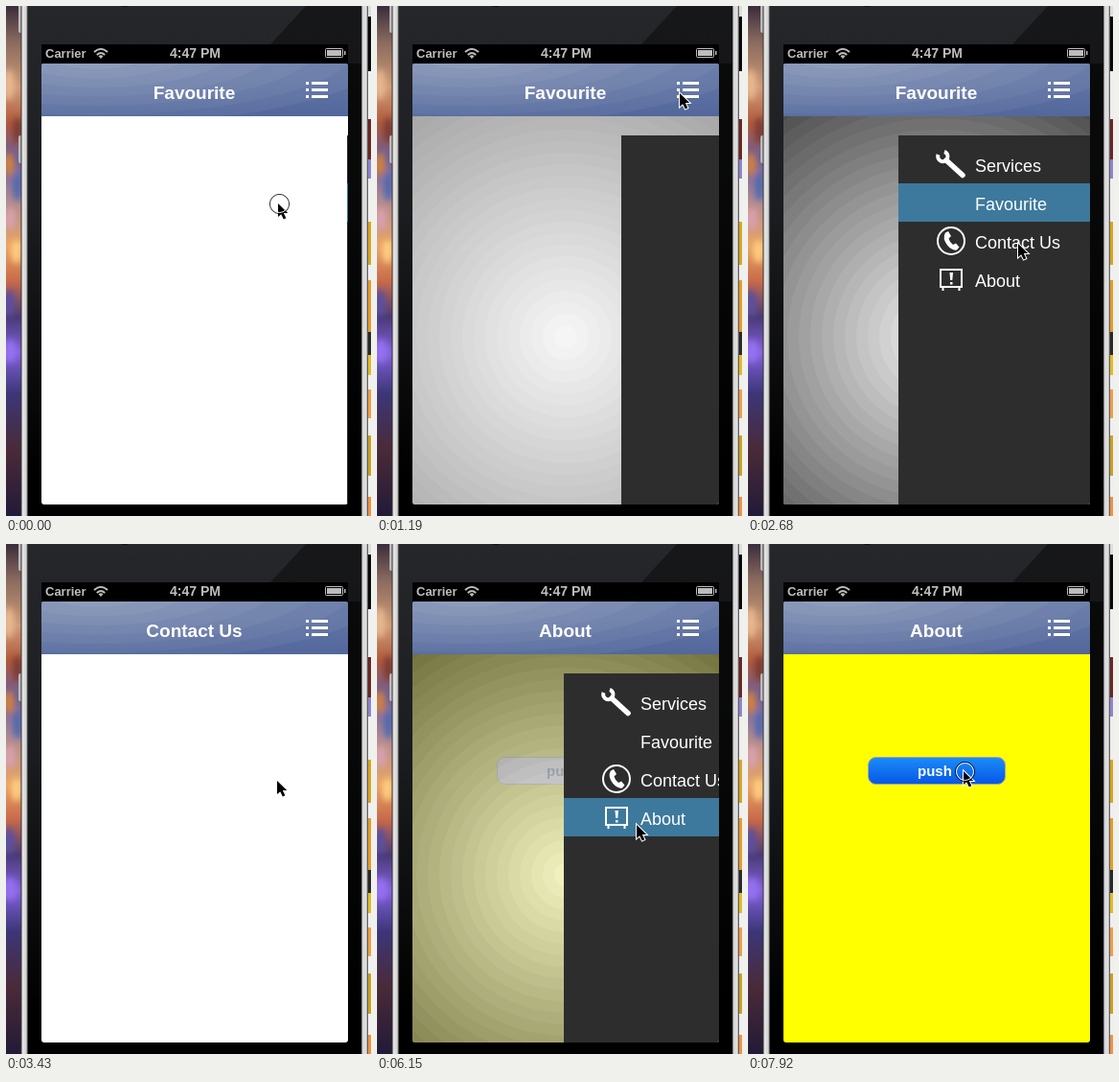
An HTML page for the animation above (8000 ms loop, 381 by 532 pixels).

```html
<!DOCTYPE html>
<html lang="en">
<head>
<meta charset="utf-8">
<title>Side menu</title>
<style>
  html, body { margin: 0; width: 100%; height: 100%; overflow: hidden; background: #000; }
  svg { display: block; width: 100vw; height: 100vh; }
  text { font-family: "Liberation Sans", Arial, sans-serif; fill: #fff; }
  .bold { font-weight: bold; }
</style>
</head>
<body>
<svg viewBox="0 0 381 532">
  <defs>
    <linearGradient id="sky" x2="0" y2="1">
      <stop offset="0" stop-color="#3a2c3c"/>
      <stop offset=".07" stop-color="#8a6a5e"/>
      <stop offset=".16" stop-color="#cf9a76"/>
      <stop offset=".23" stop-color="#b05a3c"/>
      <stop offset=".3" stop-color="#6a5f9c"/>
      <stop offset=".38" stop-color="#b08a90"/>
      <stop offset=".47" stop-color="#e8a464"/>
      <stop offset=".54" stop-color="#c86a4a"/>
      <stop offset=".61" stop-color="#4a3a78"/>
      <stop offset=".68" stop-color="#8060d8"/>
      <stop offset=".76" stop-color="#3c3678"/>
      <stop offset=".87" stop-color="#4a2a38"/>
      <stop offset="1" stop-color="#221a38"/>
    </linearGradient>
    <linearGradient id="bezel" x2="0" y2="1">
      <stop offset="0" stop-color="#26272b"/>
      <stop offset=".4" stop-color="#1c1d20"/>
      <stop offset=".92" stop-color="#000"/>
    </linearGradient>
    <linearGradient id="metal">
      <stop offset="0" stop-color="#333"/>
      <stop offset=".15" stop-color="#999"/>
      <stop offset=".25" stop-color="#e4e4e4"/>
      <stop offset=".75" stop-color="#d4d4d4"/>
      <stop offset=".88" stop-color="#777"/>
      <stop offset="1" stop-color="#111"/>
    </linearGradient>
    <linearGradient id="barShade" x2="0" y2="1">
      <stop offset="0" stop-color="#fff" stop-opacity=".06"/>
      <stop offset="1" stop-color="#1f3a80" stop-opacity=".1"/>
    </linearGradient>
    <linearGradient id="pressed" x2="0" y2="1">
      <stop offset="0" stop-color="#1c8cf8"/>
      <stop offset="1" stop-color="#0557e6"/>
    </linearGradient>
    <filter id="soft" x="-100%" y="-100%" width="300%" height="300%"><feGaussianBlur stdDeviation="3"/></filter>
    <clipPath id="photoClip"><rect width="16" height="532"/></clipPath>
    <clipPath id="screenClip"><rect x="37" y="60" width="320" height="460" rx="3"/></clipPath>
    <clipPath id="barClip"><rect x="37" y="60" width="320" height="55"/></clipPath>
    <clipPath id="menuClip"><rect x="157" y="135" width="200" height="385"/></clipPath>
  </defs>

  <!-- desktop -->
  <g clip-path="url(#photoClip)">
    <rect width="16" height="532" fill="url(#sky)"/>
    <g filter="url(#soft)">
      <ellipse cx="3" cy="82" rx="6" ry="16" fill="#e8b890"/>
      <ellipse cx="12" cy="130" rx="5" ry="14" fill="#7a3a30"/>
      <ellipse cx="3" cy="165" rx="6" ry="12" fill="#d08040"/>
      <ellipse cx="12" cy="188" rx="5" ry="16" fill="#5068b0"/>
      <ellipse cx="4" cy="222" rx="6" ry="12" fill="#d8a0b0"/>
      <ellipse cx="11" cy="256" rx="6" ry="12" fill="#ffcc80"/>
      <ellipse cx="3" cy="310" rx="6" ry="14" fill="#5a50a0"/>
      <ellipse cx="4" cy="360" rx="8" ry="12" fill="#9470f0"/>
    </g>
  </g>
  <g id="icons"></g>

  <!-- phone -->
  <rect x="13" y="-6" width="5" height="34" rx="2" fill="#bbb"/>
  <rect x="13" y="135" width="5" height="29" rx="2" fill="#bbb"/>
  <rect x="23" width="348" height="532" fill="url(#bezel)"/>
  <rect x="15.500" width="7.500" height="532" fill="url(#metal)"/>
  <rect x="-378" width="7.500" height="532" fill="url(#metal)" transform="scale(-1 1)"/>
  <path d="M313 0H371V532H357V40H276Z" fill="#000" opacity=".4"/>
  <path d="M357 60H371V532H357Z" fill="#000" opacity=".55"/>
  <ellipse cx="124" cy="-2" rx="6" ry="3" fill="#0c0d12"/>
  <rect x="37" y="40" width="320" height="480" fill="#000"/>

  <!-- status bar -->
  <text class="bold" x="41" y="54" font-size="13" style="fill:#bdbdbd">Carrier</text>
  <text class="bold" x="197.500" y="54" font-size="14" text-anchor="middle" style="fill:#bdbdbd">4:47 PM</text>
  <g fill="none" stroke="#bdbdbd" stroke-width="2">
    <path d="M92 48Q99 41.500 106 48M94.800 51Q99 47 103.200 51"/>
    <path d="M96.500 52.300Q99 50.300 101.500 52.300L99 55Z" fill="#bdbdbd" stroke="none"/>
    <rect x="333.500" y="44.500" width="18" height="9" rx="1" stroke-width="1"/>
  </g>
  <path d="M335 46H350V52H335ZM353 47H354.500V51H353Z" fill="#bdbdbd"/>

  <g clip-path="url(#screenClip)">
    <rect id="page" x="37" y="60" width="320" height="460"/>
    <g id="button">
      <rect id="buttonFace" x="125.500" y="222.500" width="143" height="28" rx="8" stroke="#a3a3a3"/>
      <text id="buttonText" class="bold" x="177" y="242" font-size="15">push</text>
    </g>
    <g id="dim"></g>
    <g id="navBar" clip-path="url(#barClip)"></g>
    <text id="title" class="bold" x="196.500" y="97" font-size="19" text-anchor="middle"></text>
    <path id="listIcon" d="M313 79h3v3h-3zM313 86h3v3h-3zM313 93h3v3h-3zM319 79h17v3h-17zM319 86h17v3h-17zM319 93h17v3h-17z"/>
    <g id="menu" clip-path="url(#menuClip)">
      <rect x="157" y="135" width="200" height="385" fill="#2d2d2d"/>
      <g id="rows"></g>
    </g>
  </g>

  <g id="pointer">
    <path d="M0 0V14L3.200 11.200L5.800 16.500L8.300 15.300L5.800 10H10.200Z" fill="#000" stroke="#fff" stroke-width="2" paint-order="stroke"/>
    <g id="ring" fill="none">
      <circle cx="1.500" cy=".5" r="10" stroke="#000"/>
      <circle cx="1.500" cy=".5" r="9" stroke="#fff"/>
    </g>
  </g>
</svg>
<script>
const LOOP = 8000;
const $ = id => document.getElementById(id);

function add(parent, tag, attrs, text) {
  const el = document.createElementNS("http://www.w3.org/2000/svg", tag);
  for (const key in attrs) el.setAttribute(key, attrs[key]);
  if (text) el.textContent = text;
  parent.append(el);
  return el;
}

// Edge of the desktop icons: top and colour of each strip.
[[0, "#ddd"], [11, "#080808"], [68, "#eee"], [118, "#6b2525"], [160, "#8d83d0"], [180, "#eee"],
 [225, "#d9a41c"], [270, "#eee"], [286, "#e59a28"], [340, "#282828"], [364, "#e2ba25"], [385, "#eee"],
 [400, "#f09c45"], [430, "#eee"], [448, "#c9a022"], [490, "#eee"], [512, "#f09040"]]
  .forEach(([y, fill]) => add($("icons"), "rect", { x: 377, y, width: 4, height: 532 - y, fill }));

// Banded radial backdrop behind the open menu.
const BAND = 12;
for (let r = 33 * BAND; r > 0; r -= BAND) {
  const grey = Math.max(76, Math.round(240 - 0.57 * (r - BAND / 2)));
  add($("dim"), "circle", { cx: 197, cy: 345, r, fill: `rgb(${grey},${grey},${grey})` });
}

// Navigation bar: wide arcs growing darker away from the upper left.
const bar = $("navBar");
add(bar, "rect", { x: 37, y: 60, width: 320, height: 55, fill: "#586c9f" });
for (let i = 6; i >= 0; i--) {
  const k = i / 7;
  add(bar, "ellipse", {
    cx: 95, cy: 38, rx: 65 + 42 * i, ry: 28 + 9.5 * i,
    fill: `rgb(${Math.round(136 - 46 * k)},${Math.round(151 - 41 * k)},${Math.round(183 - 22 * k)})`
  });
}
add(bar, "rect", { x: 37, y: 60, width: 320, height: 55, fill: "url(#barShade)" });

const ICONS = [
  g => {
    add(g, "path", { d: "M198.500 155A5.200 5.200 0 1 0 205 152", fill: "none", stroke: "#fff", "stroke-width": 4 });
    add(g, "path", { d: "M207 161L224 176.500", stroke: "#fff", "stroke-width": 5.5, "stroke-linecap": "round" });
  },
  () => {},
  g => {
    add(g, "circle", { cx: 212, cy: 245, r: 14, fill: "none", stroke: "#fff", "stroke-width": 2 });
    add(g, "path", {
      d: "M206 236.500L209 235L212 240L209.500 242.500Q210.500 246.500 214 249L217 247.500L220.500 251.500L218 254.500Q213 255.500 208 249.500Q202.500 242 206 236.500Z",
      fill: "#fff"
    });
  },
  g => {
    add(g, "path", { d: "M201 275H223V293H201ZM203.500 293V297M220.500 293V297", fill: "none", stroke: "#fff", "stroke-width": 2 });
    add(g, "path", { d: "M210.500 278H214L213.300 286H211.200ZM211 288H213.500V290.500H211Z", fill: "#fff" });
  }
];

const rows = ["Services", "Favourite", "Contact Us", "About"].map((label, i) => {
  const g = add($("rows"), "g", {});
  const back = add(g, "rect", { x: 157, y: 145 + 40 * i, width: 200, height: 40, fill: "#3d799c" });
  const content = add(g, "g", {});
  ICONS[i](content);
  add(content, "text", { x: 237, y: 173 + 40 * i, "font-size": 18 }, label);
  return { g, back, content, label };
});

// Each step holds until the next and changes only the listed values.
const steps = [
  { at: 0, x: 284, y: 206, ring: 1, menu: 356, dim: 0, selected: 1, page: 1, slide: 0, iconDown: 0, buttonDown: 0 },
  { at: 150, ring: 0, menu: 357 },
  { at: 440, x: 289, y: 188 },
  { at: 590, x: 300, y: 148 },
  { at: 740, x: 312, y: 108 },
  { at: 890, x: 316, y: 90 },
  { at: 1040, ring: 1, menu: 354, dim: 0.015, iconDown: 1 },
  { at: 1190, ring: 0, y: 91, menu: 255, dim: 0.5, slide: 200, iconDown: 0 },
  { at: 1340, menu: 157, dim: 1 },
  { at: 1490, slide: 95 },
  { at: 1640, slide: 3 },
  { at: 1790, slide: 0 },
  { at: 2090, x: 311, y: 122 },
  { at: 2240, x: 299, y: 178 },
  { at: 2390, x: 287, y: 230 },
  { at: 2540, x: 282, y: 248 },
  { at: 2690, ring: 1, selected: 2 },
  { at: 2840, ring: 0, page: 2, menu: 255, dim: 0.5 },
  { at: 2980, menu: 357, dim: 0 },
  { at: 3430, x: 283, y: 247 },
  { at: 5260, x: 271, y: 298, ring: 1, menu: 157, dim: 1 },
  { at: 5410, y: 293, selected: 3 },
  { at: 5550, ring: 0 },
  { at: 6150, page: 3, menu: 195, dim: 0.8 },
  { at: 6300, menu: 310, dim: 0.25 },
  { at: 6440, menu: 357, dim: 0 },
  { at: 7030, x: 264, y: 283 },
  { at: 7180, x: 247, y: 262 },
  { at: 7320, x: 231, y: 243 },
  { at: 7470, x: 225, y: 237 },
  { at: 7920, ring: 1, buttonDown: 1 }
];

function stateAt(time) {
  return Object.assign({}, ...steps.filter(step => step.at <= time));
}

function show(el, on) {
  el.setAttribute("visibility", on ? "visible" : "hidden");
}

function render(time) {
  const s = stateAt(time);
  $("pointer").setAttribute("transform", `translate(${s.x} ${s.y})`);
  show($("ring"), s.ring);
  $("title").textContent = rows[s.page].label;
  $("listIcon").setAttribute("fill", s.iconDown ? "#8b8e98" : "#fff");
  $("page").setAttribute("fill", s.page === 3 ? "#ff0" : "#fff");
  $("dim").setAttribute("opacity", s.dim);
  $("menu").setAttribute("transform", `translate(${s.menu - 157} 0)`);

  // Lower rows arrive later.
  rows.forEach((row, i) => {
    const offset = Math.max(0, s.slide - 40 * (3 - i));
    row.g.setAttribute("transform", `translate(${offset} 0)`);
    row.content.setAttribute("opacity", Math.max(0, 1 - offset / 40));
    show(row.back, i === s.selected);
  });

  show($("button"), s.page === 3);
  $("buttonFace").setAttribute("fill", s.buttonDown ? "url(#pressed)" : "#fff");
  $("buttonText").style.fill = s.buttonDown ? "#fff" : "#38508a";
}

let start;
function tick(now) {
  start ??= now;
  render((now - start) % LOOP);
  requestAnimationFrame(tick);
}
render(0);
requestAnimationFrame(tick);
</script>
</body>
</html>
```
